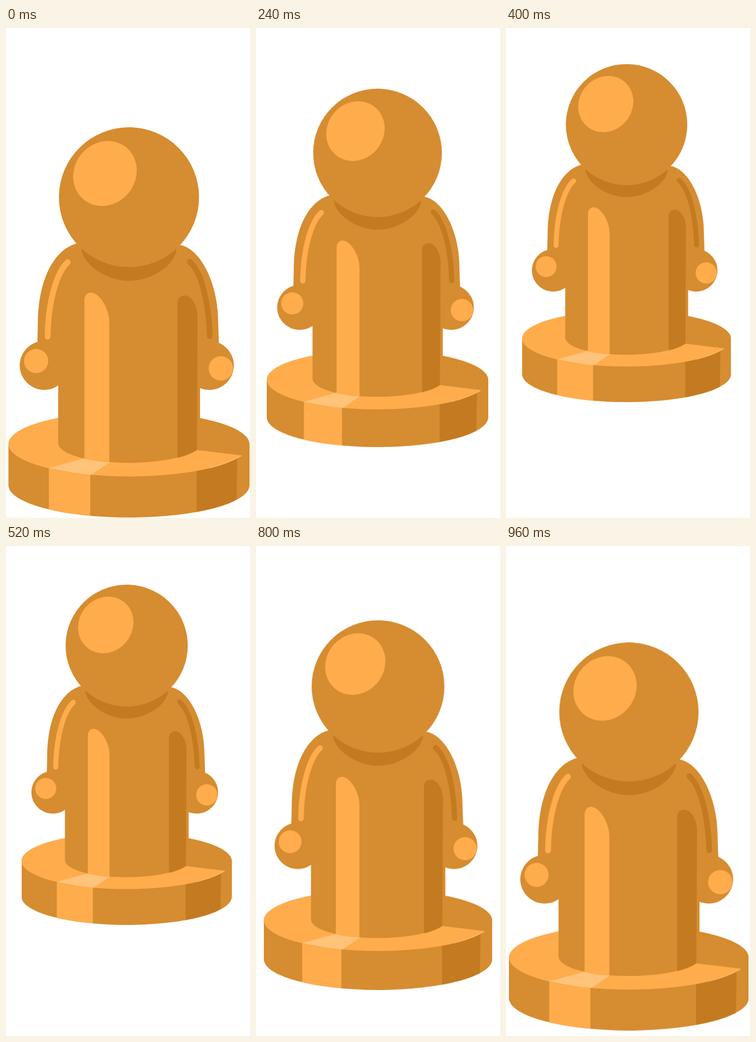
An HTML page for the animation above (1 s loop, 498x1002 px).

```html
<!DOCTYPE html>
<html lang="en">
<head>
<meta charset="utf-8">
<title>Bouncing pawn</title>
<style>
  html, body { margin: 0; width: 100%; height: 100%; overflow: hidden; background: #fff; }
  svg { display: block; width: 498px; height: 1002px; }
  .main { fill: #d68c30; }
  .light { fill: #ffac4c; }
  .dark { fill: #c47a20; }
  .pale { fill: #ffc37a; }
  .shine { fill: none; stroke: #ffac4c; stroke-width: 12; stroke-linecap: round; }
  .shade { fill: none; stroke: #c47a20; stroke-width: 11.5; stroke-linecap: round; }

  /* 25 pictures per second, scaled about a point far above the stage */
  .pawn { transform-origin: 214px -766px; animation: hop 1s infinite; }
  @keyframes hop {
    0%   { transform: scale(1);     animation-timing-function: steps(6); }
    24%  { transform: scale(.9185); animation-timing-function: steps(4); }
    40%  { transform: scale(.8665); animation-timing-function: steps(1); }
    44%  { transform: scale(.849);  animation-timing-function: steps(2); }
    52%  { transform: scale(.872);  animation-timing-function: steps(1); }
    56%  { transform: scale(.881);  animation-timing-function: steps(3); }
    68%  { transform: scale(.9146); animation-timing-function: steps(3); }
    80%  { transform: scale(.9472); animation-timing-function: steps(4); }
    96%  { transform: scale(.9941); animation-timing-function: steps(1); }
    100% { transform: scale(1); }
  }
</style>
</head>
<body>
<svg viewBox="0 0 498 1002">
  <defs>
    <clipPath id="top"><ellipse cx="251" cy="851" rx="246" ry="66"/></clipPath>
    <clipPath id="base">
      <path d="M5 851A246 66 0 0 0 497 851V935A246 66 0 0 1 5 935Z"/>
    </clipPath>
  </defs>
  <g class="pawn">
    <!-- base -->
    <path class="main" d="M5 851A246 66 0 0 1 497 851V935A246 66 0 0 1 5 935Z"/>
    <g clip-path="url(#base)">
      <path class="light" d="M87.500 890H172V1002H87.500Z"/>
      <path class="dark" d="M389 890L480 872L472 881L470 1002H389Z"/>
    </g>
    <g clip-path="url(#top)">
      <path class="light" d="M0 780H250V850L390 863L481 874L460 920H0Z"/>
      <path class="pale" d="M87 900L160 880L212 888L171 916Z"/>
    </g>
    <path fill="none" stroke="#ffc37a" stroke-width="1.2" d="M415 900Q452 890 480 875"/>

    <!-- hands and body -->
    <circle class="main" cx="78" cy="690" r="50"/>
    <circle class="main" cx="415" cy="690" r="50"/>
    <path class="main" d="M143 441C95 455 65 520 65 605L64 645L106.500 731V848C107 872 170 889 250 889
      C310 889 360 880 390 863L396 797V736L434.500 645L433 600C433 530 402 455 357 444Z"/>
    <path class="light" d="M160 881V557C160 547 166 541 173 541C190 541 211 572 211 603V888Q185 887 160 881Z"/>
    <path class="dark" d="M350 879V562C350 552 357 547 365 547C378 547 391 566 391 592L389.500 863Q375 873 350 879Z"/>
    <path class="shine" d="M126 479C103 500 86 560 85 631"/>
    <path class="shade" d="M375 478C400 500 414 565 416 630"/>
    <circle class="light" cx="61.500" cy="681" r="24.700"/>
    <circle class="light" cx="438.500" cy="696" r="25"/>

    <!-- head -->
    <path class="dark" d="M154 452L348 453C346 482 300 517 251 517C205 517 157 484 154 452Z"/>
    <circle class="main" cx="251" cy="346" r="143"/>
    <ellipse class="light" rx="68.800" ry="62.500" transform="translate(202 297.500) rotate(-52)"/>
  </g>
</svg>
</body>
</html>
```
